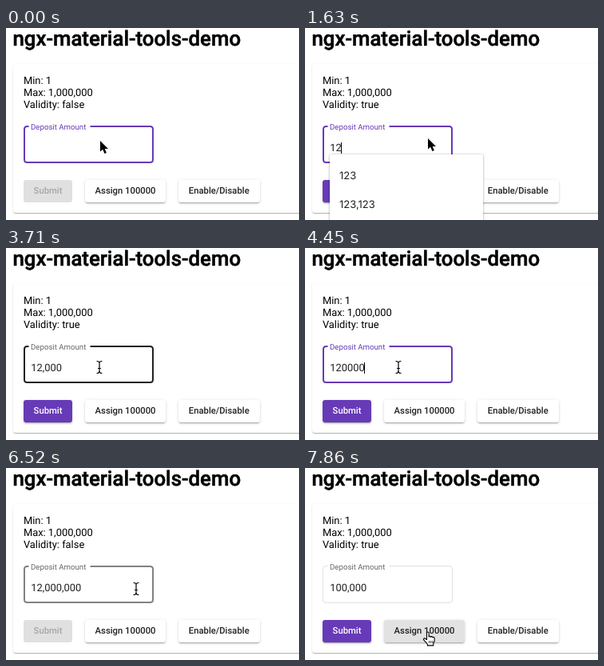
An HTML page for the animation above (8 s loop, 367 by 240 pixels).

```html
<!DOCTYPE html>
<html lang="en">
<head>
<meta charset="utf-8">
<title>ngx-material-tools-demo</title>
<style>
  html, body { margin: 0; width: 100%; height: 100%; overflow: hidden; background: #fff; }
  body { position: relative; font-family: Roboto, sans-serif; }
  div, svg { position: absolute; }
  svg { left: 0; top: 0; width: 367px; height: 240px; overflow: hidden; }
  text { font-size: 12.9px; text-rendering: geometricPrecision; white-space: pre; }

  .card {
    left: 9px; top: 45px; width: 400px; height: 186px; border-radius: 3.2px;
    box-shadow: 0 1.6px .8px -.8px rgba(0,0,0,.2), 0 .8px .8px rgba(0,0,0,.14), 0 .8px 2.4px rgba(0,0,0,.12);
  }
  .button {
    top: 189.5px; height: 28.6px; border-radius: 3.2px; background: #fff;
    box-shadow: 0 2.4px .8px -1.6px rgba(0,0,0,.2), 0 1.6px 1.6px rgba(0,0,0,.14), 0 .8px 4px rgba(0,0,0,.12);
  }
  #submit { left: 22px; width: 61px; background: #673ab7; }
  #submit.disabled { background: #e0e0e0; box-shadow: none; }
  #assign { left: 98.5px; width: 101.6px; }
  #toggle { left: 216px; width: 101.6px; }

  .title { font-size: 25.8px; font-weight: 500; stroke: #000; stroke-width: .55px; }
  .caption { font-size: 11.28px; font-weight: 500; fill: #212121; }
  #label { font-size: 9.67px; }
  #value { fill: #212121; }
  .outline { fill: none; }

  #popup {
    left: 31px; top: 158px; width: 192px; height: 110px; border-radius: 2px;
    background: #fff; box-shadow: 0 .5px 3px rgba(0,0,0,.4);
  }
  #popup text { font: 13px Inter, sans-serif; fill: #222; }
</style>
</head>
<body>
<div class="card"></div>
<div class="button" id="submit"></div>
<div class="button" id="assign"></div>
<div class="button" id="toggle"></div>

<svg>
  <text class="title" x="8.5" y="22">ngx-material-tools-demo</text>
  <text x="21.9" y="70.3">Min: 1</text>
  <text x="21.9" y="85.3">Max: 1,000,000</text>
  <text x="21.9" y="100.3" id="validity"></text>
  <path class="outline" id="thin" stroke="#e0e0e0" stroke-width="1"/>
  <path class="outline" id="thick" stroke-width="2"/>
  <text id="label" x="31" y="127">Deposit Amount</text>
  <text id="value" x="31.3" y="154"></text>
  <rect id="caret" y="143" width="1" height="14"/>
  <text class="caption" id="submitText" x="34.6" y="207">Submit</text>
  <text class="caption" x="111.6" y="207">Assign 100000</text>
  <text class="caption" x="228.8" y="207">Enable/Disable</text>
</svg>

<div id="popup">
  <svg><text x="12" y="31">123</text><text x="12" y="67">123,123</text></svg>
</div>

<svg>
  <g id="arrow" stroke-linejoin="round">
    <path d="M0 0V13.6L3.2 10.7L5.4 16L7.9 15L5.7 9.9H10Z" fill="#000" stroke="#fff" stroke-width="2" paint-order="stroke"/>
  </g>
  <g id="beam" fill="none" stroke-linecap="round">
    <path d="M-3-7.5Q0-7.5 0-5V5Q0 7.5-3 7.5M3-7.5Q0-7.5 0-5M0 5Q0 7.5 3 7.5M-1.5 1.5H1.5" stroke="#fff" stroke-width="2.6"/>
    <path d="M-3-7.5Q0-7.5 0-5V5Q0 7.5-3 7.5M3-7.5Q0-7.5 0-5M0 5Q0 7.5 3 7.5M-1.5 1.5H1.5" stroke="#000" stroke-width="1.2"/>
  </g>
  <g id="hand" stroke="#000" stroke-width="1.1" stroke-linejoin="round">
    <path d="M-1.5 10V1.8a1.3 1.3 0 0 1 2.7 0V6.6a1.25 1.25 0 0 1 2.4.3a1.25 1.25 0 0 1 2.4.5a1.2 1.2 0 0 1 2.2.8V12L6.8 14.6V17.4H-.6V15.6L-5.3 10.4a1.3 1.3 0 0 1 1.9-1.7Z" fill="#fff"/>
    <path d="M1.6 11.5V14.5M3.7 11.5V14.5M5.8 11.5V14.5" fill="none" stroke-width=".8"/>
  </g>
</svg>

<script>
const DURATION = 8000;
const PURPLE = '#673ab7';
const HOVER = '#212121';
const $ = id => document.getElementById(id);

// Each step changes only the listed properties; `border` is [colour, opacity] of the thick outline.
const steps = [
  [0, { value: '', valid: false, border: [PURPLE, 1], focus: true, caret: false, popup: false,
        assign: '#fff', pointer: ['arrow', 118, 141] }],
  [140, { value: '1', valid: true, caret: true }],
  [290, { popup: true }],
  [590, { pointer: ['arrow', 142, 136] }],
  [740, { pointer: ['arrow', 156, 138], caret: false }],
  [1040, { value: '12', caret: true }],
  [1190, { pointer: ['arrow', 154, 138] }],
  [1780, { value: '120', popup: false }],
  [1930, { value: '1200' }],
  [2230, { value: '12000' }],
  [2670, { pointer: ['arrow', 214, 129] }],
  [2820, { pointer: ['arrow', 233, 134], caret: false }],
  [3110, { value: '12,000', focus: false, border: [HOVER, 0] }],
  [3410, { pointer: ['arrow', 202, 141] }],
  [3560, { pointer: ['beam', 130, 149], border: [HOVER, .55] }],
  [3710, { pointer: ['beam', 117, 149], border: [HOVER, 1] }],
  [3860, { value: '12000', focus: true, border: [PURPLE, 1], caret: true }],
  [4450, { value: '120000' }],
  [4740, { value: '1200000', valid: false }],
  [4890, { value: '12000000' }],
  [5340, { caret: false }],
  [5490, { pointer: ['beam', 142, 150] }],
  [5640, { pointer: ['arrow', 201, 154] }],
  [5780, { pointer: ['arrow', 215, 156] }],
  [6230, { value: '12,000,000', focus: false, border: [HOVER, 0] }],
  [6370, { pointer: ['arrow', 194, 153] }],
  [6520, { pointer: ['beam', 163, 151], border: [HOVER, .55] }],
  [6670, { pointer: ['beam', 154, 160], border: [HOVER, .9] }],
  [6820, { pointer: ['arrow', 151, 179], border: [HOVER, .4] }],
  [6960, { pointer: ['hand', 153, 200], border: [HOVER, .1], assign: '#f5f5f5' }],
  [7110, { pointer: ['hand', 154, 204.5], border: [HOVER, 0] }],
  [7410, { assign: '#e8e8e8' }],
  [7560, { value: '100,000', valid: true, assign: '#dcdcdc' }],
  [7710, { assign: '#e2e2e2' }],
];

// Rounded field border with a gap for the label.
function outline(left, top, right, bottom, r = 3.5) {
  return `M28.5 ${top}H${left + r}Q${left} ${top} ${left} ${top + r}V${bottom - r}` +
    `Q${left} ${bottom} ${left + r} ${bottom}H${right - r}Q${right} ${bottom} ${right} ${bottom - r}` +
    `V${top + r}Q${right} ${top} ${right - r} ${top}H105.5`;
}
$('thin').setAttribute('d', outline(22.5, 122.5, 184.5, 168.5));
$('thick').setAttribute('d', outline(23, 123, 184, 168));

function stateAt(time) {
  const state = {};
  for (const [start, change] of steps) if (start <= time) Object.assign(state, change);
  return state;
}

function render(s) {
  $('validity').textContent = `Validity: ${s.valid}`;
  $('submit').classList.toggle('disabled', !s.valid);
  $('submitText').style.fill = s.valid ? '#fff' : '#a6a6a6';
  $('assign').style.background = s.assign;

  const [color, opacity] = s.border;
  $('thick').style.stroke = color;
  $('thick').style.opacity = opacity;
  $('thin').style.opacity = 1 - opacity;
  $('label').style.fill = s.focus ? PURPLE : '#666';

  const value = $('value');
  value.textContent = s.value;
  const width = s.value ? value.getComputedTextLength() : 0;
  $('caret').setAttribute('x', Math.floor(31.3 + width));
  $('caret').style.display = s.caret ? '' : 'none';
  $('popup').style.display = s.popup ? '' : 'none';

  const [kind, x, y] = s.pointer;
  for (const id of ['arrow', 'beam', 'hand']) $(id).style.display = id === kind ? '' : 'none';
  $(kind).setAttribute('transform', `translate(${x} ${y})`);
}

const origin = performance.now();
function tick() {
  render(stateAt((performance.now() - origin) % DURATION));
  requestAnimationFrame(tick);
}
tick();
</script>
</body>
</html>
```
